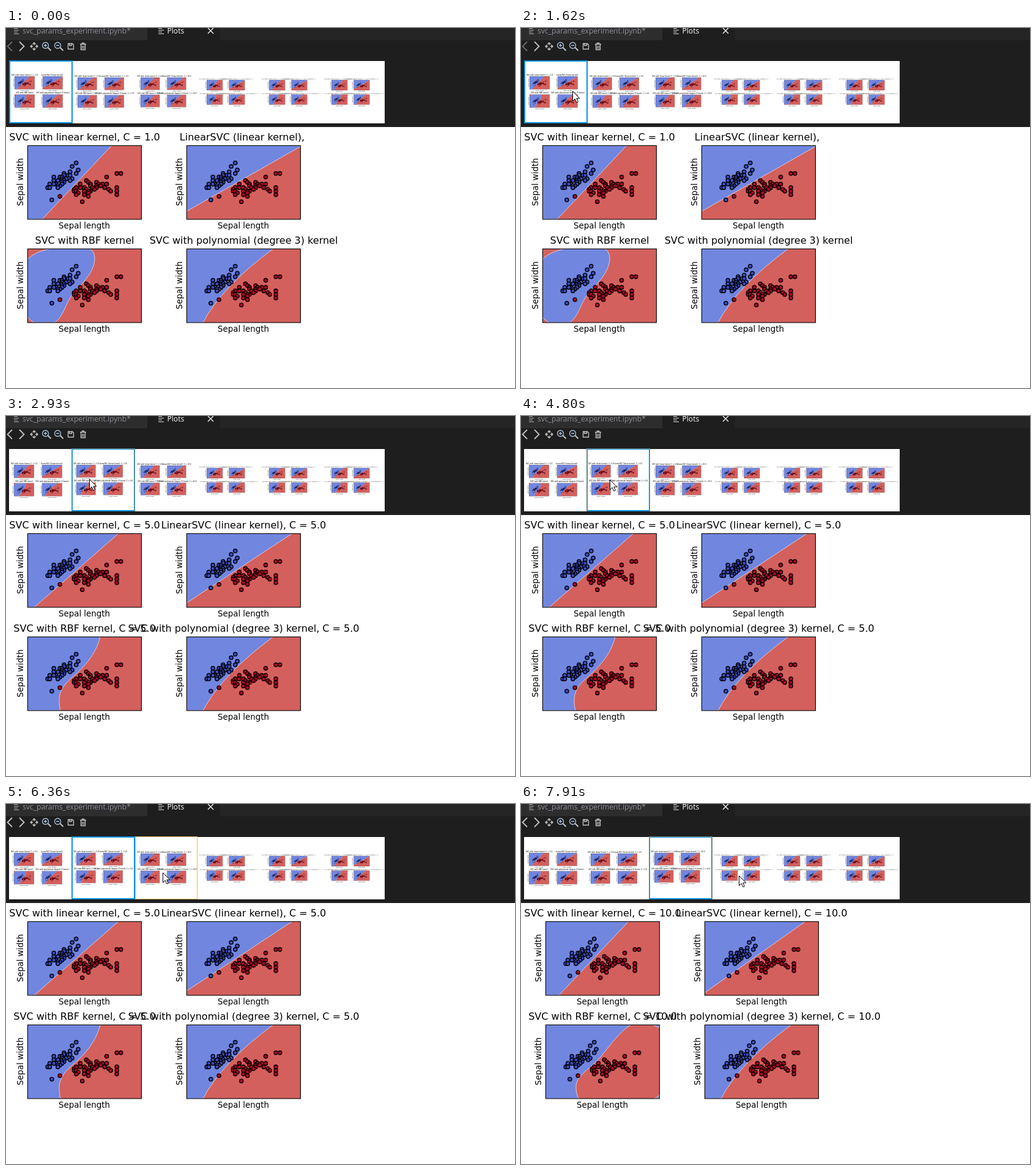
Animation, 832 px wide and 589 px high, one loop 7.99 s. Source, as an HTML page with a canvas:

```html
<!DOCTYPE html>
<html lang="en">
<head>
<meta charset="utf-8">
<title>Plots</title>
<style>
html, body { margin: 0; width: 100%; height: 100%; overflow: hidden; background: #fff; }
canvas { display: block; }
</style>
</head>
<body>
<canvas id="stage" width="832" height="589"></canvas>
<script>
const ctx = document.getElementById('stage').getContext('2d');
const LOOP = 7990, W = 186, H = 121;
const BLUE = '#7186df', RED = '#d3605d', SELECT = '#0c93e4';

// Iris measurements: sepal length, sepal width
const setosa = [
  5.7,4.4, 5.5,4.2, 5.8,4, 5.7,3.8, 5.4,3.9, 5.1,3.8, 5.3,3.7, 5.4,3.7, 5.1,3.7, 4.6,3.6, 4.9,3.6,
  5,3.6, 5.1,3.5, 5.2,3.5, 5,3.5, 5.5,3.5, 4.6,3.4, 4.8,3.4, 5,3.4, 5.1,3.4, 5.4,3.4, 5.1,3.3,
  5,3.3, 4.7,3.2, 4.6,3.2, 4.4,3.2, 5,3.2, 4.9,3.1, 4.8,3.1, 4.3,3, 4.4,3, 4.8,3, 4.5,2.3];
const others = [
  7.9,3.8, 7.7,3.8, 7.2,3.6, 6.2,3.4, 6.3,3.3, 6.7,3.3, 7.2,3.2, 7,3.2, 6.8,3.2, 6.4,3.2, 5.9,3.2,
  6.9,3.1, 6.7,3.1, 6.4,3.1, 7.7,3, 7.1,3, 6.7,3, 6.5,3, 6.1,3, 5.9,3, 5.7,3, 5.6,2.9, 6.2,2.9,
  6.6,2.9, 7.3,2.9, 7.7,2.8, 7.4,2.8, 6.4,2.8, 6.3,2.8, 6.1,2.8, 5.6,2.8, 5.7,2.8, 6.3,2.7,
  5.8,2.7, 7.7,2.6, 6.1,2.6, 5.7,2.6, 6.3,2.5, 4.9,2.5, 6,2.2];

// Blue decision regions for each set of four classifiers
const poly = 'M0,0H142Q58,62 27,121H0Z';
const regions = [
  ['M0,0H138L24,121H0Z', 'M0,0H186V2L0,108Z',
   'M0,17Q14,4 38,0H101C108,3 110,10 110,16C110,36 92,55 78,70C62,86 60,112 44,121H11Q4,117 0,112Z', poly],
  ['M0,0H149L11,121H0Z', 'M0,0H173L0,114Z',
   'M0,0H119C112,30 90,52 75,65C55,82 48,95 54,121H0Z', poly],
  ['M0,0H136L22,121H0Z', 'M0,0H165L0,117Z',
   'M0,0H140C120,12 104,36 90,53C72,74 48,84 50,104Q50,114 54,121H0ZM175,0H186V5ZM178,121Q183,119 186,115V121Z', poly]
].map(set => set.map(d => new Path2D(d)));

function titles(param) {
  const tail = param ? ', ' + param : '';
  return ['SVC with linear kernel, ' + (param || 'C = 1.0'), 'LinearSVC (linear kernel), ' + param,
    'SVC with RBF kernel' + tail, 'SVC with polynomial (degree 3) kernel' + tail];
}
const views = ['', 'C = 5.0', 'C = 10.0'].map((p, i) => ({ titles: titles(p), regions: regions[i] }));
const gammaViews = [1, 2, 3].map(g => ({ titles: titles('C = 10.0, gamma = ' + g), regions: regions[0] }));

function text(str, x, y, font, color = '#000', align = 'center') {
  ctx.font = font;
  ctx.fillStyle = color;
  ctx.textAlign = align;
  ctx.fillText(str, x, y);
}

function dots(data, color) {
  ctx.fillStyle = color;
  ctx.strokeStyle = '#000';
  ctx.lineWidth = 1.35;
  for (let i = 0; i < data.length; i += 2) {
    ctx.beginPath();
    ctx.arc((data[i] - 3.3) * W / 5.6, (5.4 - data[i + 1]) * H / 4.2, 3.1, 0, 7);
    ctx.fill();
    ctx.stroke();
  }
}

function plot(title, region) {
  ctx.save();
  ctx.beginPath();
  ctx.rect(0, 0, W, H);
  ctx.clip();
  ctx.fillStyle = RED;
  ctx.fillRect(0, 0, W, H);
  ctx.fillStyle = BLUE;
  ctx.fill(region);
  ctx.strokeStyle = 'rgba(240,230,230,.75)';
  ctx.lineWidth = 1;
  ctx.stroke(region);
  dots(setosa, '#3b4cc0');
  dots(others, '#b40426');
  ctx.restore();
  ctx.strokeStyle = '#000';
  ctx.lineWidth = 1.1;
  ctx.strokeRect(.4, .4, W, H - .4);
  const label = '13.4px "DejaVu Sans", sans-serif';
  text(title, 93.5, -8, '16px "DejaVu Sans", sans-serif');
  text('Sepal length', 93, 136, label);
  ctx.save();
  ctx.translate(-7.5, 60);
  ctx.rotate(-Math.PI / 2);
  text('Sepal width', 0, 0, label);
  ctx.restore();
}

// x, y place the upper left axes corner
function grid(view, x, y, scale) {
  for (let k = 0; k < 4; k++) {
    ctx.save();
    ctx.translate(x, y);
    ctx.scale(scale, scale);
    ctx.translate(260 * (k % 2), 169 * (k >> 1));
    plot(view.titles[k], view.regions[k]);
    ctx.restore();
  }
}

function line(d, color, width = 1.3) {
  ctx.strokeStyle = color;
  ctx.lineWidth = width;
  ctx.stroke(new Path2D(d));
}

function rect(color, x, y, w, h) {
  ctx.fillStyle = color;
  ctx.fillRect(x, y, w, h);
}

function header(selected) {
  rect('#1e1e1e', 0, 0, 832, 162);
  rect('#252526', 350, 0, 482, 20);
  rect('#2d2d2d', 0, 0, 231, 20);
  const font = '12.1px "Open Sans", sans-serif', dim = '#958f9c', icon = '#c5c5c5';
  text('svc_params_experiment.ipynb*', 27, 9, font, dim, 'left');
  text('Plots', 263.5, 9, font, '#fff', 'left');
  line('M13,.5h6M13,3.5h8M13,6.5h6M13,9.5h8', '#b5b5b5', 1.2);
  line('M249,.5h6M249,3.5h9M249,6.5h6M249,9.5h9', '#e0e0e0', 1.2);
  line('M330,0l9,9M339,0l-9,9', '#fff', 1.3);
  line('M10,22.5L2.5,30L10,37.5', selected ? icon : '#6e6e6e', 1.8);
  line('M22,22.5L29.5,30L22,37.5', icon, 1.8);
  line('M46,24v4M46,32v4M40,30h4M48,30h4M43.5,26.5L46,24l2.5,2.5M43.5,33.5L46,36l2.5-2.5M42.5,27.5L40,30l2.5,2.5M49.5,27.5L52,30l-2.5,2.5', icon);
  for (const x of [65, 85]) {
    line(`M${x + 3.5},32l5,5`, icon, 1.9);
    line(`M${x + 4.5},28.5a5,5 0 1 1-10,0a5,5 0 1 1 10,0M${x - 3},28.5h5`, '#a9c3dc');
  }
  line('M64.5,26v5', '#a9c3dc');
  line('M101.5,25.5h7l2,2v7h-9zM103.5,25.5v3h4v-3', icon);
  line('M121,26.5h10M124.5,26v-1.5h3V26M122.5,27v8.5h7V27M124.7,29v5M127.3,29v5', icon);
}

function filmstrip(selected, hover) {
  rect('#fff', 5, 54, 614, 102);
  grid(views[0], selected ? 13 : 14, selected ? 80 : 79, .1765);
  grid(views[1], [117, 115, 114][selected], selected === 1 ? 80 : 81, .17);
  grid(views[2], selected === 2 ? 218 : 220, selected === 2 ? 80 : 81, .167);
  gammaViews.forEach((view, i) => grid(view, 328 + 102 * i, 85, .14));
  const x = 6 + 102 * selected;
  ctx.strokeStyle = SELECT;
  ctx.lineWidth = 2;
  ctx.strokeRect(x, 54, 102, 101);
  if (hover < 0) return;
  ctx.lineWidth = 1;
  if (hover === selected) {
    line(`M${x - .5},156V53.5H${x + 102.5}V156`, 'rgba(200,140,60,.6)', 1);
  } else {
    ctx.strokeStyle = '#e2b65c';
    ctx.strokeRect(5.5 + 103 * hover, 53.5, 101, 102);
  }
}

const arrow = new Path2D('M.5,.5V16.5L4.2,13L6.8,18.8L9.4,17.7L6.8,12H11.8Z');
const mix = (a, b, u) => a + (b - a) * u;
const easeInOut = u => u ** 1.4 / (u ** 1.4 + (1 - u) ** 1.4);
const glide = (x0, y0, x1, y1, ease) => u => [mix(x0, x1, ease(u)), mix(y0, y1, ease(u))];
const bend = [[94, 205], [85, 172], [76, 138], [73, 113], [84, 103], [101, 103], [118, 103], [131, 103], [136, 103]];

// Pointer moves: first step, last step, number of steps, path
const moves = [
  [530, 1300, 11, glide(753, 626, 94, 205, u => 1 - (1 - u) ** 1.5)],
  [1380, 1930, 8, u => bend[Math.round(u * 8)]],
  [3870, 3870, 1, () => [138, 103]],
  [4800, 5350, 8, glide(138, 103, 256, 112, easeInOut)],
  [7360, 7910, 8, glide(256, 112, 356, 117, easeInOut)]
];

function pointer(t) {
  const move = moves.filter(m => t >= m[0]).pop();
  if (!move) return null;
  const [start, end, n, path] = move;
  const step = n > 1 ? Math.floor((t - start) * (n - 1) / (end - start)) + 1 : 1;
  return path(Math.min(step, n) / n).map(Math.round);
}

let shown = '';
function draw(now) {
  requestAnimationFrame(draw);
  const t = now % LOOP;
  const selected = t < 2930 ? 0 : t < 6740 ? 1 : 2;
  const hover = t < 2550 ? -1 : t < 6360 ? 1 : 2;
  const at = pointer(t);
  const key = [selected, hover, at].join();
  if (key === shown) return;
  shown = key;
  rect('#fff', 0, 0, 832, 589);
  header(selected);
  filmstrip(selected, hover);
  grid(views[selected], selected === 2 ? 40 : 35, 192, 1);
  if (!at) return;
  ctx.save();
  ctx.translate(...at);
  ctx.fillStyle = '#fff';
  ctx.fill(arrow);
  ctx.strokeStyle = '#000';
  ctx.lineWidth = 1;
  ctx.stroke(arrow);
  ctx.restore();
}
requestAnimationFrame(draw);
</script>
</body>
</html>
```
